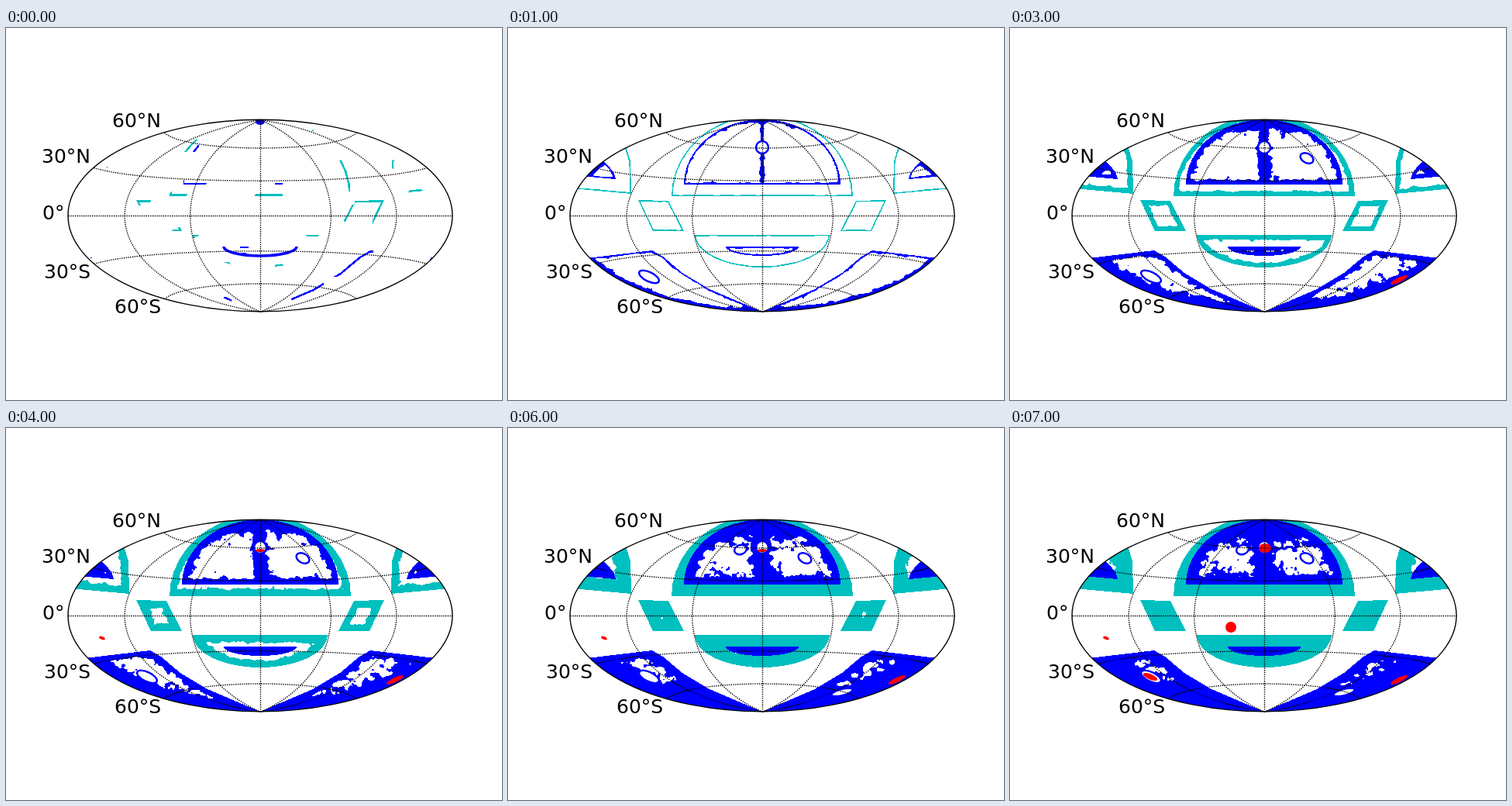
These frames come from a looping animation (640x480 px, 8000 ms). An HTML page with a canvas:

```html
<!DOCTYPE html>
<html>
<head>
<meta charset="utf-8">
<style>
  html, body { margin: 0; width: 100%; height: 100%; overflow: hidden; background: #fff; }
  canvas, svg { position: absolute; left: 0; top: 0; }
  text { font: 25px "DejaVu Sans", sans-serif; }
</style>
</head>
<body>
<canvas id="map" width="640" height="480"></canvas>
<svg width="640" height="480">
  <text x="137" y="128">60°N</text>
  <text x="46" y="174">30°N</text>
  <text x="47" y="247">0°</text>
  <text x="49" y="323">30°S</text>
  <text x="140" y="368">60°S</text>
</svg>
<script>
const W = 640, H = 480, STEPS = 8, STEP_MS = 1000;
const CX = 328, CY = 242, RX = 248, RY = 123.8;
const CYAN = [0, 191, 191], BLUE = [0, 0, 255];
const ctx = document.getElementById('map').getContext('2d');

// Smooth value noise, 0 to 1
function hash(x, y) {
  const v = Math.sin(x * 127.1 + y * 311.7) * 43758.5453;
  return v - Math.floor(v);
}
function noise(x, y) {
  const ix = Math.floor(x), iy = Math.floor(y);
  const ease = t => t * t * (3 - 2 * t), mix = (a, b, t) => a + (b - a) * t;
  const u = ease(x - ix), v = ease(y - iy);
  return mix(mix(hash(ix, iy), hash(ix + 1, iy), u),
             mix(hash(ix, iy + 1), hash(ix + 1, iy + 1), u), v);
}

const mirror = pts => pts.map(([x, y]) => [2 * CX - x, y]);

function arc(cy, rx, ry, from, to) {
  const pts = [];
  for (let i = 0; i <= 20; i++) {
    const a = Math.PI * (from + (to - from) * i / 20);
    pts.push([CX + rx * Math.cos(a), cy + ry * Math.sin(a)]);
  }
  return pts;
}

// Surveyed areas; later ones lie on top
const areas = [];
const area = (color, pts) => areas.push({ color, pts });
const pair = (color, pts) => { area(color, pts); area(color, mirror(pts)); };

const vInner = [[60, 450], [60, 281], [186, 270], [212, 297], [250, 325], [290, 343], [328, 350]];
pair(CYAN, [[40, 203], [159, 214], [158, 172], [152, 152], [140, 130], [40, 130]]);
pair(CYAN, [[168, 222], [207, 223], [227, 262], [187, 262]]);
area(CYAN, arc(217, 117, 105, 1, 2));
area(CYAN, arc(267, 87, 42, 0, 1));
area(CYAN, [...vInner, ...mirror(vInner).reverse()]);
pair(BLUE, [[139, 195], [137, 188], [130, 178], [118, 168], [60, 150], [60, 188]]);
pair(BLUE, [...arc(202, 101, 84, 1, 1.5), [CX, 202]]);
area(BLUE, arc(282, 47, 12, 0, 1));
pair(BLUE, [[60, 302], [186, 287], [200, 295], [225, 316], [260, 337], [300, 354], [CX, 366], [CX, 450], [60, 450]]);

// Distance to the outline, or -1 outside
function depth(pts, x, y) {
  let best = Infinity, inside = false;
  pts.forEach(([bx, by], i) => {
    const [ax, ay] = pts[(i || pts.length) - 1];
    const dx = bx - ax, dy = by - ay;
    const t = Math.max(0, Math.min(1, ((x - ax) * dx + (y - ay) * dy) / (dx * dx + dy * dy)));
    best = Math.min(best, Math.hypot(x - ax - t * dx, y - ay - t * dy));
    if (ay > y !== by > y && x < ax + (y - ay) / dy * dx) inside = !inside;
  });
  return inside ? best : -1;
}

function rimDepth(x, y) {
  const dx = (x - CX) / RX, dy = (y - CY) / RY, s = Math.hypot(dx, dy);
  return (1 - s) * s / Math.hypot(dx / RX, dy / RY);
}

// Two spots in the southern band that fill last
const lateness = (x, y) => [[124, 282], [535, 284]].reduce(
  (sum, [a, b]) => sum + 25 * Math.exp(-(((x - a) / 14) ** 2) - ((y - b) / 6) ** 2), 0);

// Areas fill inwards from their outlines, unevenly
const cells = [];
for (let py = 118; py < 367; py++) {
  for (let px = 80; px < 576; px++) {
    const x = px + .5, y = py + .5, rim = rimDepth(x, y);
    if (rim < 0) continue;
    let top = null, edge = 0;
    for (const a of areas) {
      const d = depth(a.pts, x, y);
      if (d >= 0) { top = a; edge = d; }
    }
    if (!top) continue;
    const grain = noise(x / 8, y / 6) * .65 + noise(x / 3, y / 3) * .35;
    const level = top.color === BLUE
      ? Math.min(edge, rim / 2) * (.3 + 1.4 * grain)
      : edge * (.65 + .7 * grain) + lateness(x, y);
    const early = edge < 2.5 && noise(x / 22 + 9, y / 22) > .72;
    cells.push({ at: (py * W + px) * 4, color: top.color, level, early });
  }
}

function drawCoverage(step) {
  const image = ctx.createImageData(W, H);
  image.data.fill(255);
  const reach = new Map([[CYAN, .6 + step ** 1.6], [BLUE, 2.2 * step]]);
  for (const c of cells)
    if (step ? c.level < reach.get(c.color) : c.early) image.data.set(c.color, c.at);
  ctx.putImageData(image, 0, 0);
}

function oval(x, y, rx, ry, turn = 0, end = 2 * Math.PI) {
  ctx.beginPath();
  ctx.ellipse(x, y, rx, ry, turn, 0, end);
}

// First step, then the ellipse
const spots = [[0, 328, 121, 6, 4], [2, 322, 125, 16, 7, -.3], [2, 329, 178, 10, 8]];
const rings = [[1, 328, 154, 8, 8], [1, 182, 321, 14, 6, .45], [3, 383, 168, 9, 6, .5],
               [6, 300, 157, 8, 6, -.3], [6, 431, 341, 14, 4, -.25]];
const hits = [[3, 502, 325, 12, 3, -.45], [4, 328, 158, 6, 2], [4, 124, 271, 4, 2, .4],
              [7, 329, 155, 8, 6], [7, 181, 321, 10, 3.5, .4], [7, 285, 257, 7, 7]];

function drawMarks(step) {
  const each = (list, paint) => list.forEach(([first, ...shape]) => {
    if (step >= first) { oval(...shape); paint(); }
  });
  ctx.strokeStyle = ctx.fillStyle = '#00f';
  ctx.lineWidth = 3.5;
  if (!step) { oval(CX, 282, 47, 12, 0, Math.PI); ctx.stroke(); }
  each(spots, () => ctx.fill());
  ctx.lineWidth = 2.5;
  ctx.fillStyle = '#fff';
  each(rings, () => { ctx.fill(); ctx.stroke(); });
  ctx.fillStyle = '#f00';
  each(hits, () => ctx.fill());
}

// Hammer projection
function project(lat, lon) {
  const f = Math.PI / 180, c = Math.cos(lat * f), h = lon * f / 2;
  const d = Math.sqrt(1 + c * Math.cos(h));
  return [CX + RX * c * Math.sin(h) / d + .5, CY - RY * Math.sin(lat * f) / d + .5];
}

function gridLine(limit, place) {
  ctx.beginPath();
  for (let v = -limit; v <= limit; v += 2) ctx.lineTo(...place(v));
  ctx.stroke();
}

function drawGrid() {
  ctx.strokeStyle = '#000';
  ctx.lineWidth = 1.39;
  ctx.setLineDash([1.39, 1.39]);
  for (let lat = -60; lat <= 60; lat += 30) gridLine(180, lon => project(lat, lon));
  for (let lon = -120; lon <= 120; lon += 60) gridLine(90, lat => project(lat, lon));
  ctx.setLineDash([]);
  oval(CX, CY, RX, RY);
  ctx.stroke();
}

function draw(step) {
  drawCoverage(step);
  ctx.save();
  oval(CX, CY, RX, RY);
  ctx.clip();
  drawMarks(step);
  ctx.restore();
  drawGrid();
}

let shown = -1;
function tick() {
  const step = Math.floor(performance.now() / STEP_MS) % STEPS;
  if (step !== shown) draw(shown = step);
  requestAnimationFrame(tick);
}
tick();
</script>
</body>
</html>
```
